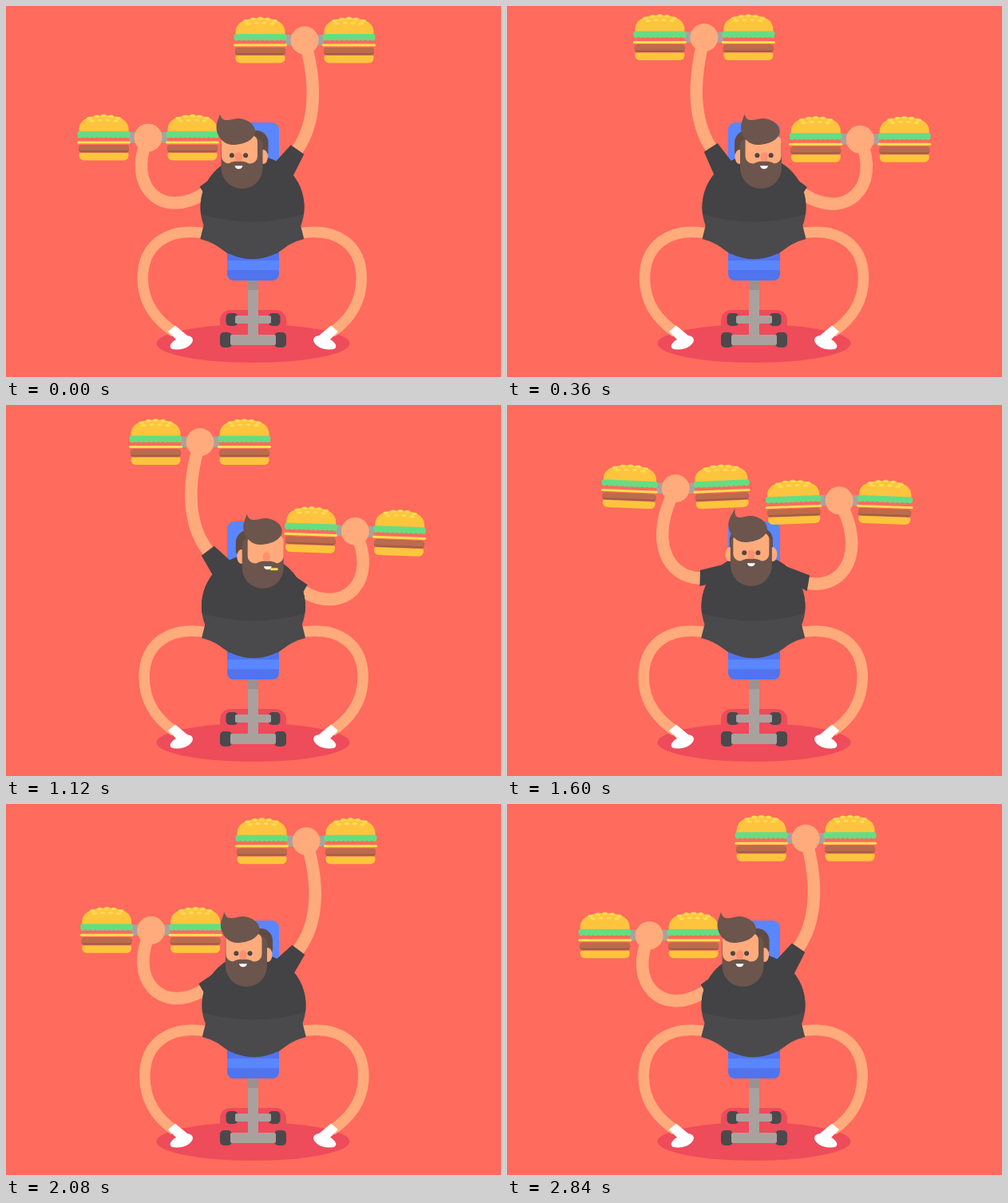
These frames come from a looping animation (620x465 px, 2.88 s). An HTML page with a canvas:

```html
<!DOCTYPE html>
<html lang="en">
<head>
<meta charset="utf-8">
<title>Burger lifter</title>
<style>
html, body { margin: 0; width: 100%; height: 100%; overflow: hidden; background: #ff6b5c; }
canvas { display: block; width: 620px; height: 465px; }
</style>
</head>
<body>
<canvas id="stage" width="620" height="465"></canvas>
<script>
const ctx = document.getElementById('stage').getContext('2d');
const HALF = 1440, WIDTH = 619;
const SKIN = '#ffab7c', HAIR = '#6b554c', BACK_HAIR = '#604b44', SHIRT = '#434245', BELLY = '#4a494c';
const BUN = '#ffc43e', SEED = '#ffdc55', GREY = '#aaa19e', IRON = '#4b494c', SHADE = '#ee4b5b';
const BLUE = '#5074ee', LIGHT_BLUE = '#5a86ff';

const progress = (time, from, to) => Math.min(1, Math.max(0, (time - from) / (to - from)));

// Smooth step from 0 to 1.
function ease(time, from, to) {
  const s = progress(time, from, to);
  return s * s * (3 - 2 * s);
}

// Smooth rise from 0 to 1 and back.
const bump = (time, from, to) => Math.sin(Math.PI * progress(time, from, to)) ** 2;

// Pose for the half in which the left arm rises; the other half is its mirror image.
function poseAt(time) {
  const overshoot = bump(time, 280, 560);
  const relax = ease(time, 400, 620) - ease(time, 1100, HALF);
  return {
    rise: ease(time, 0, 390) + .07 * overshoot - .03 * relax,
    fall: 1 - ease(time, 0, 320) - .03 * overshoot + .055 * relax,
    bend: bump(time, 0, 340),
    tilt: 2 * bump(time, 800, HALF),
    sway: -Math.cos(3 * Math.PI * Math.sqrt(time / HALF)),
    headX: 295.5 + 22.5 * ease(time, 0, 230) + 5.5 * ease(time, 600, HALF),
    headY: bump(time, 800, HALF) - 2 * bump(time, 0, 360),
    turn: 2 * ease(time, 0, 320) - 1 + .15 * bump(time, 800, HALF),
    flick: bump(time, 0, 320),
    bite: Math.min(1, 1.5 * bump(time, 980, 1260))
  };
}

function fill(color, path) {
  ctx.fillStyle = color;
  ctx.fill(new Path2D(path));
}

function stroke(color, width, path) {
  ctx.strokeStyle = color;
  ctx.lineWidth = width;
  ctx.stroke(new Path2D(path));
}

function box(color, left, top, right, bottom, radius = 0) {
  ctx.fillStyle = color;
  ctx.beginPath();
  ctx.roundRect(left, top, right - left, bottom - top, radius);
  ctx.fill();
}

function oval(color, x, y, rx, ry = rx) {
  ctx.fillStyle = color;
  ctx.beginPath();
  ctx.ellipse(x, y, rx, ry, 0, 0, 7);
  ctx.fill();
}

function saved(draw) {
  ctx.save();
  draw();
  ctx.restore();
}

function mirrored(draw) {
  saved(() => {
    ctx.translate(WIDTH, 0);
    ctx.scale(-1, 1);
    draw();
  });
}

function drawFloorWeight(y, half, radius, barHalf, barRadius) {
  for (const side of [-1, 1]) {
    const x = 309.5 + side * half;
    box(IRON, x - 7.5, y - radius, x + 7.5, y + radius, 5);
  }
  box(GREY, 309.5 - barHalf, y - barRadius, 309.5 + barHalf, y + barRadius, 2);
}

function drawBench() {
  oval(SHADE, 309.5, 423, 121, 24);
  box(SHADE, 268, 381, 351, 425, 13);
  drawFloorWeight(393, 26.5, 8, 22.5, 5);
  drawFloorWeight(418.5, 34, 9.5, 28.5, 6.5);
  box(GREY, 303, 343, 316, 424);
  box('#9b9190', 303, 343, 316, 356);
  box(LIGHT_BLUE, 277, 146, 342, 300, 9);
  box(BLUE, 277, 290, 342, 344, 8);
  box(LIGHT_BLUE, 277, 319, 342, 331);
}

function drawLeg(sway) {
  const knee = 172.5 + sway;
  stroke(SKIN, 13.5, `M${252 + sway} 285C${201 + sway} 276 ${knee} 302 ${knee} 341C${knee} 375 191 395 211 409`);
  fill('#fff', 'M203 408L212 400.5L227 413Q234 414 234 419C233 425 224 431 214 430.5C206 431 204 427 207 423Q210 419 213 418Z');
  fill(BELLY, `M${249.5 + sway} 272L${244.5 + sway} 292Q${262 + sway} 296 ${280 + sway} 311L${290 + sway} 270Z`);
}

function drawBurger() {
  fill(BUN, 'M-31 -6V-10C-31 -22 -20 -28 0 -28S31 -22 31 -10V-6Z');
  for (let i = -2; i <= 2; i++) oval(SEED, i * 9, -27.6 + i * i * .8, 3.2, 1.8);
  for (let i = -2; i < 2; i++) oval(SEED, i * 10 + 5, -22.5 + Math.abs(i + .5), 3, 1.6);
  box('#66dd82', -33, -8, 33, -2, 3);
  for (let i = -5; i <= 5; i++) oval('#66dd82', i * 5.9, -2.8, 3.3);
  box('#ffdf50', -33.5, 4.5, 33.5, 7.5, 1.5);
  box('#a25d47', -31.5, 9, 31.5, 18.5, 4);
  box('#bc6b4d', -31.5, 9, 31.5, 16, [4, 4, 2, 2]);
  box(BUN, -31, 19, 31, 28.5, [2, 2, 6, 6]);
}

function drawDumbbell(x, y, bend, tilt) {
  const stretch = Math.abs(bend) / 2.2;
  saved(() => {
    ctx.translate(x, y);
    ctx.rotate(tilt * Math.PI / 180);
    box(GREY, -24, -7, 24, 6.5);
    for (const side of [-1, 1]) saved(() => {
      ctx.rotate(side * bend * Math.PI / 180);
      ctx.translate(side * (55.5 + 2 * stretch), 0);
      ctx.scale(1 + .06 * stretch, 1 - .05 * stretch);
      drawBurger();
    });
    oval(SKIN, 0, 0, 17.5);
  });
}

// Lift runs from 0 (hand by the shoulder) to 1 (arm stretched up).
function drawArm(lift, bend, tilt) {
  const mid = .43;
  const blend = (low, middle, high) =>
    low * (lift - mid) * (lift - 1) / mid +
    middle * lift * (1 - lift) / (mid * (1 - mid)) +
    high * lift * (lift - mid) / (1 - mid);
  const handX = 178 + 67 * lift, handY = 165 - 122 * lift;
  const elbowX = blend(195, 199, 230), elbowY = blend(269, 224, 145);
  const cuffX = blend(248, 241.5, 254), cuffY = blend(235, 220.5, 180);
  const dx = cuffX - elbowX, dy = cuffY - elbowY, length = Math.hypot(dx, dy);
  const nx = -dy / length * 10, ny = dx / length * 10;
  stroke(SKIN, 15.5, `M${handX} ${handY}C${blend(150, 171.5, 230)} ${blend(225, 178, 95)} ${elbowX} ${elbowY} ${cuffX} ${cuffY}l${dx / length * 3} ${dy / length * 3}`);
  fill(SHIRT, `M${cuffX + nx} ${cuffY + ny}L${cuffX - nx} ${cuffY - ny}L283 197L290 225L264 222Z`);
  drawDumbbell(handX, handY, bend, tilt);
}

function drawBody(sway) {
  saved(() => {
    ctx.translate(309.5 + sway, 0);
    oval(BELLY, 0, 252.2, 65);
    fill(SHIRT, 'M-64.4 261Q0 280 64.4 261A65 65 0 1 0 -64.4 261Z');
  });
}

function drawMouth(x, y, bite, side) {
  saved(() => {
    ctx.translate(x + bite * 1.5 * side, y + bite);
    fill('#fff', 'M-5 0H5Q4 4 0 4T-5 0Z');
    ctx.scale(side, 1);
    if (bite > 0) box('#ffd84f', 3, 2, 3 + 10 * bite, 5, 1.5);
  });
}

function drawHead(x, y, turn, flick, bite, side) {
  saved(() => {
    ctx.translate(x, y);
    box(BACK_HAIR, -27 - 6 * turn, 156, 27 - 6 * turn, 186, [15, 15, 3, 3]);
    for (const ear of [-1, 1]) oval(SKIN, ear * (27 - 12 * Math.max(0, ear * turn)), 189, 5.5, 9);
    box(HAIR, -26, 166, 26, 229, [8, 8, 26, 26]);
    box(SKIN, -22.5 + 3 * turn, 162, 22.5 + 3 * turn, 197.5, [8, 8, 9, 9]);
    const middle = 4 * turn;
    oval(HAIR, middle, 199, 13, 4.5);
    box('#ff9070', middle - 4.5, 183.5, middle + 4.5, 195, 4.5);
    if (bite < .9) {
      for (const eye of [-8.6, 8.6]) oval('#514643', middle + eye, 187.3, 3, 3 * (1 - bite));
    }
    drawMouth(middle, 200.3, bite, side);
    ctx.translate(3.5 * turn - 4, 0);
    const tip = `${-20 - 4 * flick} ${135.5 + 4 * flick}`;
    fill(HAIR, `M${tip}C-18 144 -12 144 -4 142C8 138 24 146 24 157C24 168 9 174 -4 174C-16 174 -25 162 -24.5 151C-24 145 -22 142 ${tip}Z`);
  });
}

function draw(now) {
  const side = now % (2 * HALF) < HALF ? 1 : -1;
  const pose = poseAt(now % HALF), sway = side * pose.sway;

  box('#ff6b5c', 0, 0, 620, 465);
  drawBench();
  drawLeg(sway * 1.3);
  mirrored(() => drawLeg(-sway * 1.3));

  const rising = () => drawArm(pose.rise, 2 * pose.bend, 0);
  const falling = () => drawArm(pose.fall, -2.4 * pose.bend, -pose.tilt);
  (side > 0 ? rising : falling)();
  mirrored(side > 0 ? falling : rising);

  drawBody(sway);
  drawHead(side > 0 ? pose.headX : WIDTH - pose.headX, pose.headY,
    side * pose.turn, side * pose.flick, pose.bite, side);
}

const start = performance.now();
function tick() {
  draw(performance.now() - start);
  requestAnimationFrame(tick);
}
tick();
</script>
</body>
</html>
```
